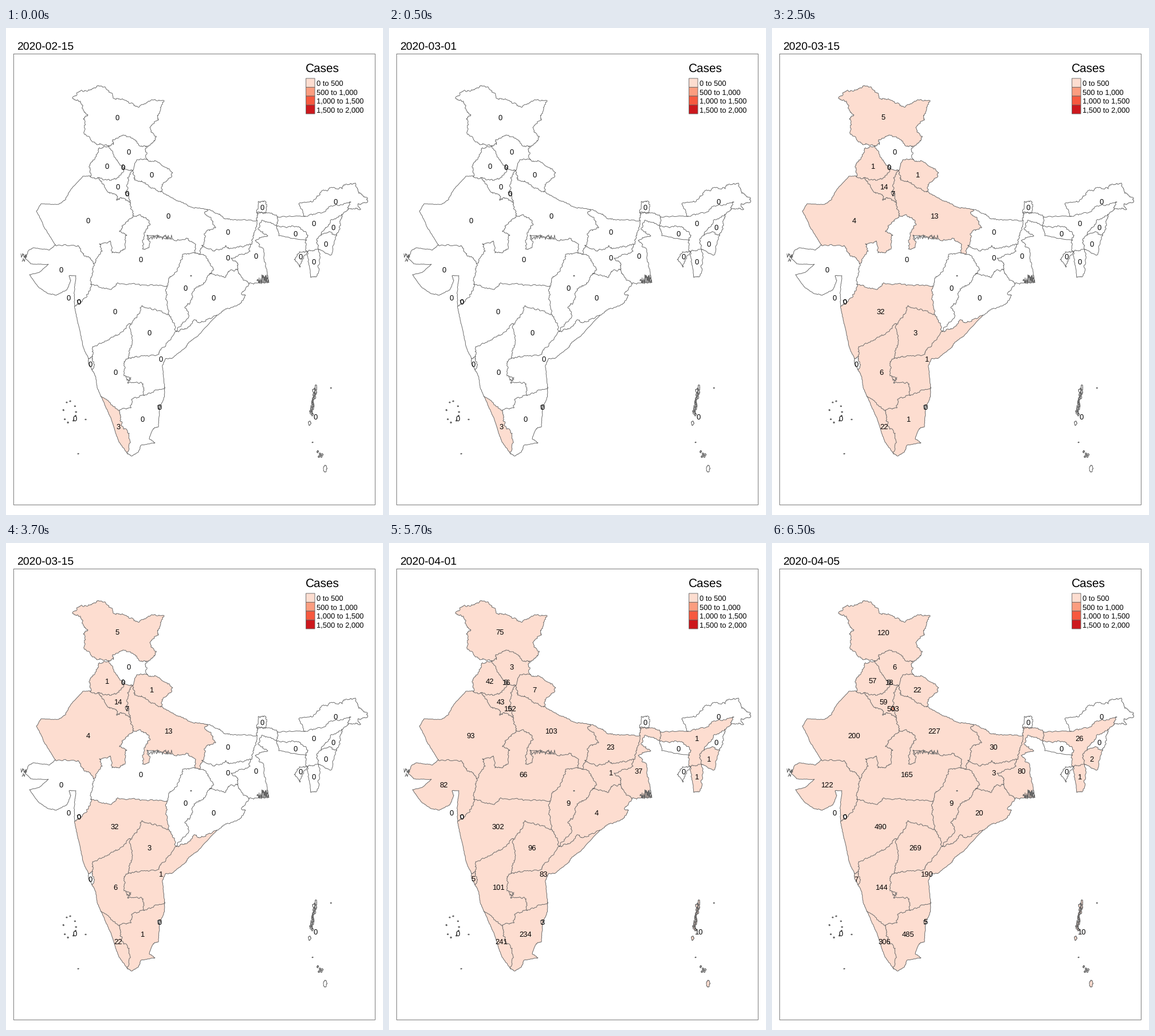
A matplotlib script that plays this animation: 658x851 px, repeating every 8 s.

```python
import matplotlib.pyplot as plt
import numpy as np
from matplotlib.animation import FuncAnimation

W, H, DPI = 658, 851, 64
PT = 72 / DPI
LINE = "#666666"
REDS = ["#FDDDD0", "#FC9D7F", "#F7593F", "#CC181D"]
STEP = 500
DATES = ["2020-02-15", "2020-03-01", "2020-03-15", "2020-04-01", "2020-04-05"]
STARTS = [0, 500, 2500, 4500, 6500]

plt.rcParams.update({"font.family": "Liberation Sans", "text.hinting": "none"})
rng = np.random.default_rng(7)
fig = plt.figure(figsize=(W / DPI, H / DPI), dpi=DPI, facecolor="white")
ax = fig.add_axes([0, 0, 1, 1])
ax.set(xlim=(0, W), ylim=(H, 0))
ax.axis("off")

arcs, regions = {}, []


def rough(points, jag):
    """Split segments at midpoints pushed sideways by at most jag pixels."""
    p = np.array(points, float)
    for _ in range(4):
        d = np.diff(p, axis=0)
        length = np.hypot(*d.T)[:, None] + 1e-9
        push = np.minimum(0.38 * length, jag) * rng.uniform(-1, 1, length.shape)
        out = np.empty((2 * len(p) - 1, 2))
        out[::2] = p
        out[1::2] = (p[:-1] + p[1:]) / 2 + push * np.c_[-d[:, 1], d[:, 0]] / length
        p = out
    return p


def line(points):
    ax.plot(*np.transpose(points), color=LINE, lw=0.95 * PT, zorder=2)


def arc(name, *points, jag=1.7):
    arcs[name] = rough(points, jag)
    line(arcs[name])


def coast(name, *points):
    arc(name, *points, jag=0.5)


def blob(name, x, y, w, h):
    a = np.linspace(0, 2 * np.pi, 8)[:-1]
    r = rng.uniform(0.7, 1.2, 7) / 2
    p = np.c_[x + w * r * np.cos(a), y + h * r * np.sin(a)]
    arc(name, *p, p[0], jag=0.4)


def creeks(x0, y0, x1, y1, n):
    line(np.c_[np.linspace(x0, x1, n), rng.uniform(y0, y1, n)])


def text(x, y, s, size=13, ha="left"):
    return ax.text(x, y, s, fontsize=size * PT, ha=ha, va="baseline", color="black", zorder=4)


def box(x, y, w, h, fc="none"):
    ax.add_patch(plt.Rectangle((x, y), w, h, fc=fc, ec=LINE, lw=0.9 * PT, snap=False, zorder=3))


def ring(spec):
    return np.concatenate([arcs[n.lstrip("-")][::-1 if n[0] == "-" else 1] for n in spec.split()])


def region(spec, x, y, *counts):
    """Shapes from joined arcs, with the counts from March to April 5th."""
    counts = counts or (0, 0, 0, 0)
    shapes = [ax.fill(*ring(s).T, fc="white", ec="none", zorder=1)[0]
              for s in spec.split("|") if s]
    regions.append((shapes, text(x, y + 4.6, "", ha="center"), (counts[0], *counts)))


# Points where three borders, or a border and the outline, meet
jk_hp_pb, jk_hp, hp_uk, hp_uk_up = (179, 206), (246, 207), (247, 230), (221, 249)
hp_hr_pb, hr_pb_rj, pb_rj, hr_rj_up = (207, 246), (160, 262), (147, 259), (217, 305)
uk_up, br_up, br_jh_up, cg_jh_up = (270, 286), (351, 317), (342, 380), (337, 395)
cg_mp_up, mp_rj_up, gj_rj, gj_mp_rj = (330, 393), (222, 328), (86, 379), (153, 412)
gj_mh_mp, gj_mh, cg_mh_mp, cg_mh_tg = (148, 448), (120, 486), (281, 451), (283, 500)
ap_cg_tg, ka_mh_tg, ap_ka_tg, ap_ka_tn = (298, 530), (217, 517), (214, 577), (241, 642)
ap_tn, ka_kl_tn, kl_tn, ka_kl = (277, 628), (198, 668), (212, 744), (166, 644)
ga_mh, ga_ka_mh, ga_ka, ap_or = (144, 578), (151, 574), (150, 597), (368, 502)
or_wb, jh_or_wb, cg_jh_or, br_jh_wb = (424, 447), (403, 422), (355, 430), (427, 378)
br_wb, as_wb, as_ml_wb, as_ml = (438, 336), (474, 330), (473, 346), (524, 371)
ar_as, ar_as_nl, as_nl, as_mn_nl = (522, 329), (597, 317), (586, 326), (550, 361)
mn_nl, as_mn_mz, as_mz_tr = (577, 362), (546, 387), (526, 391)

# North
arc("jk", jk_hp_pb, (155, 201), (137, 186), (135, 159), (143, 152), (136, 145), (130, 128),
    (116, 122), (130, 110), (149, 108), (159, 101), (173, 103), (192, 125), (205, 125),
    (230, 138), (252, 127), (276, 127), (266, 152), (266, 161), (251, 174), (262, 189),
    (257, 199), jk_hp)
arc("jkhp", jk_hp_pb, (188, 203), (187, 195), (205, 187), (224, 195), (237, 206), jk_hp)
arc("hpE", jk_hp, (243, 213), hp_uk)
arc("hpuk", hp_uk, (229, 230), hp_uk_up)
arc("hphr", hp_uk_up, hp_hr_pb)
arc("hppb", hp_hr_pb, (192, 229), jk_hp_pb)
arc("pbW", jk_hp_pb, (161, 211), (155, 229), (145, 243), pb_rj)
arc("pbrj", pb_rj, hr_pb_rj)
arc("pbhr", hr_pb_rj, (184, 266), (197, 261), hp_hr_pb)
arc("hrrj", hr_pb_rj, (167, 268), (178, 287), (192, 291), (193, 301), (201, 296), hr_rj_up)
arc("hrup", hr_rj_up, (212, 283), (212, 262), hp_uk_up)
arc("ukE", hp_uk, (267, 235), (291, 253), (278, 269), uk_up)
arc("ukup", uk_up, (243, 270), (225, 266), hp_uk_up)
arc("upN", uk_up, (298, 302), (326, 314), br_up, jag=1)
arc("upbr", br_up, (347, 324), (360, 337), (366, 349), (349, 356), br_jh_up)
arc("upjh", br_jh_up, cg_jh_up)
arc("upcg", cg_jh_up, cg_mp_up)
arc("upmp", cg_mp_up, (328, 376), (315, 367), (297, 372), (246, 362), (250, 383), (238, 386),
    (241, 361), (250, 345), (249, 336), (235, 327), mp_rj_up)
arc("uprj", mp_rj_up, hr_rj_up)

# West
coast("rjW", pb_rj, (134, 259), (110, 287), (104, 300), (92, 308), (62, 307), (53, 320),
      (69, 352), gj_rj)
arc("rjgj", gj_rj, (126, 380), (136, 397), (146, 402), gj_mp_rj)
arc("rjmp", gj_mp_rj, (168, 390), (163, 377), (182, 372), (185, 393), (196, 393), (208, 385),
    (211, 362), (198, 356), (203, 345), mp_rj_up)
coast("gjW", gj_rj, (76, 388), (48, 384), (39, 389), (33, 402), (43, 412), (74, 413),
      (58, 427), (41, 431), (55, 451), (73, 464), (87, 467), (106, 458), (113, 441),
      (110, 433), (122, 433), (119, 462), gj_mh)
arc("gjmh", gj_mh, (133, 478), (144, 464), gj_mh_mp)
arc("gjmp", gj_mh_mp, (148, 436), gj_mp_rj)
arc("mpmh", gj_mh_mp, (184, 457), (196, 446), (240, 449), cg_mh_mp)
arc("mpcg", cg_mh_mp, (284, 437), (302, 417), (308, 396), cg_mp_up)
arc("mhcg", cg_mh_mp, (279, 472), cg_mh_tg)
arc("mhtg", cg_mh_tg, (262, 492), (237, 485), (229, 503), ka_mh_tg)
arc("mhka", ka_mh_tg, (205, 530), (180, 545), (151, 557), ga_ka_mh)
arc("mhga", ga_ka_mh, ga_mh)
coast("mhW", gj_mh, (125, 513), (134, 555), ga_mh)
arc("gaka", ga_ka_mh, (153, 585), ga_ka)
coast("gaW", ga_mh, (145, 588), ga_ka)

# South
arc("cgtg", cg_mh_tg, (290, 510), ap_cg_tg)
arc("cgor", ap_cg_tg, (319, 504), (313, 487), (321, 482), (328, 456), (340, 450), cg_jh_or)
arc("cgjh", cg_jh_or, (361, 420), (348, 398), cg_jh_up)
arc("tgap", ap_cg_tg, (271, 560), (267, 570), (230, 575), ap_ka_tg)
arc("tgka", ap_ka_tg, (220, 548), ka_mh_tg)
arc("apor", ap_cg_tg, (317, 523), (330, 510), (338, 515), ap_or)
coast("apE", ap_or, (333, 540), (319, 549), (314, 558), (290, 577), (278, 578), (273, 590),
      ap_tn)
arc("aptn", ap_tn, ap_ka_tn)
arc("apka", ap_ka_tn, (237, 620), (212, 620), (218, 613), (206, 608), (206, 583), ap_ka_tg)
coast("kaW", ga_ka, (155, 606), (160, 631), ka_kl)
arc("kakl", ka_kl, ka_kl_tn)
arc("katn", ka_kl_tn, (218, 664), (222, 647), ap_ka_tn)
coast("klW", ka_kl, (183, 681), (197, 723), kl_tn)
arc("kltn", ka_kl_tn, (200, 683), (206, 701), (215, 708), kl_tn)
coast("tnE", ap_tn, (276, 645), (268, 666), (266, 697), (257, 700), (250, 718), (260, 725),
      (236, 729), (231, 741), (219, 748), kl_tn)

# East
arc("orE", or_wb, (411, 465), (418, 467), (410, 481), (385, 491), ap_or, jag=1)
arc("orwb", jh_or_wb, (410, 433), or_wb)
arc("orjh", cg_jh_or, (383, 436), (388, 425), jh_or_wb)
arc("jhwb", br_jh_wb, (426, 390), (393, 402), (405, 413), jh_or_wb)
arc("brjh", br_jh_up, (364, 390), (384, 380), (394, 385), br_jh_wb)
arc("brN", br_up, (373, 325), (382, 333), (405, 335), br_wb, jag=1)
arc("brwb", br_wb, (433, 360), br_jh_wb)
arc("wbN", br_wb, (438, 323), (455, 323), as_wb)
arc("wbas", as_wb, as_ml_wb)
arc("wbE", as_ml_wb, (446, 336), (440, 350), (457, 363), (435, 371), (450, 388), (454, 420),
    (457, 445), or_wb)
arc("sk", (438, 323), (440, 304), (454, 304), (454, 322), (438, 323))
arc("asN", as_wb, ar_as, jag=1)
arc("asar", ar_as, (556, 321), (565, 312), (602, 304), ar_as_nl)
arc("asE", ar_as_nl, as_nl)
arc("asnl", as_nl, (566, 337), as_mn_nl)
arc("asmn", as_mn_nl, (542, 371), as_mn_mz)
arc("asmz", as_mn_mz, as_mz_tr)
arc("asS", as_mz_tr, as_ml)
arc("asml", as_ml, (527, 362), (511, 347), as_ml_wb)
arc("mlS", as_ml_wb, (476, 363), as_ml, jag=1)
arc("nlE", as_nl, (584, 345), mn_nl)
arc("nlmn", mn_nl, (568, 357), as_mn_nl)
arc("mnE", mn_nl, (567, 397), as_mn_mz, jag=1)
arc("mz", as_mn_mz, (545, 429), (532, 436), as_mz_tr)
arc("tr", as_mz_tr, (512, 391), (503, 405), (513, 418), as_mz_tr)
arc("ar", ar_as, (511, 308), (535, 304), (548, 288), (566, 279), (587, 281), (593, 273),
    (610, 271), (615, 288), (631, 298), (629, 305), (614, 308), (619, 317), ar_as_nl)

# Small territories, island chains and dense creeks
for name, x, y in [("dl", 211, 289), ("ch", 205, 243), ("dn", 127, 478), ("py", 267, 662)]:
    blob(name, x, y, 6, 8)
chain = "an"
for i, y in enumerate(np.linspace(628, 675, 18)):
    blob(f"an{i}", 539.5 - (y - 628) / 7 + rng.uniform(-2, 2), y, *rng.uniform((2, 4), (5, 10)))
    chain += f"|an{i}"
blob("an", 530, 690, 5, 8)
blob("nicobar", 557, 770, 6, 14)
for i in range(5):
    blob(f"islet{i}", 544 + 2 * i, 739 + rng.uniform(0, 12), 3, 4)
for i in range(9):
    a = 2.4 * i
    blob(f"atoll{i}", 111 + 11 * np.cos(a), 671 + 19 * np.sin(a), 2, 2)
for i, (x, y) in enumerate([(126, 744), (139, 684), (535, 724), (567, 629), (323, 433)]):
    blob(f"speck{i}", x, y, 2, 1.5)

creeks(438, 436, 447, 446, 18)
creeks(446, 430, 459, 447, 34)
creeks(26, 394, 36, 402, 24)
creeks(28, 401, 33, 409, 8)
creeks(246, 361, 290, 370, 40)
creeks(209, 609, 218, 617, 9)

region("jk -jkhp", 194, 156, 0, 5, 75, 120)
region("jkhp hpE hpuk hphr hppb", 214, 216, 0, 0, 3, 6)
region("pbW pbrj pbhr hppb", 176, 241, 0, 1, 42, 57)
region("ch", 204.5, 243, 0, 0, 16, 18)
region("ukE ukup -hpuk", 254, 256, 0, 1, 7, 22)
region("hrrj hrup hphr -pbhr", 195, 277, 0, 14, 43, 59)
region("rjW rjgj rjmp uprj -hrrj -pbrj", 143, 336, 0, 4, 93, 200)
region("upN upbr upjh upcg upmp uprj hrup -ukup", 283, 328, 0, 13, 103, 227)
region("dl", 211, 289, 0, 7, 152, 503)
region("brN brwb -brjh -upbr", 387, 356, 0, 0, 23, 30)
region("sk", 447, 313)
region("ar -asar", 575, 303)
region("nlE nlmn -asnl", 571, 348)
region("mnE -asmn -nlmn", 558, 377, 0, 0, 1, 2)
region("mz -asmz", 537, 408, 0, 0, 1, 1)
region("tr", 514, 399)
region("mlS asml", 505, 359)
region("asN asar asE asnl asmn asmz asS asml -wbas", 537, 341, 0, 0, 1, 26)
region("wbN wbas wbE -orwb -jhwb -brwb", 436, 398, 0, 0, 37, 80)
region("brjh jhwb -orjh cgjh -upjh", 387, 401, 0, 0, 1, 3)
region("orjh orwb orE -apor cgor", 362, 471, 0, 0, 4, 20)
region("mhcg cgtg cgor cgjh upcg -mpcg", 313, 454, 0, 0, 9, 9)
region("mpmh mpcg upmp -rjmp -gjmp", 235, 404, 0, 0, 66, 165)
region("gjW gjmh gjmp -rjgj", 96, 422, 0, 0, 82, 122)
region("", 109, 471)
region("mpmh mhcg mhtg mhka mhga -mhW gjmh", 190, 495, 0, 32, 302, 490)
region("dn", 127, 478)
region("mhtg -tgka -tgap -cgtg", 250, 532, 0, 3, 96, 269)
region("apor apE aptn apka -tgap", 270, 578, 0, 1, 83, 190)
region("mhka gaka kaW kakl katn apka tgka", 191, 601, 0, 6, 101, 144)
region("mhga gaW -gaka", 147, 587, 0, 0, 5, 7)
region("", 120, 682)
region("klW -kltn -kakl", 196, 696, 3, 22, 241, 306)
region("tnE -kltn katn -aptn", 238, 683, 0, 1, 234, 485)
region("py", 268, 662, 0, 0, 3, 5)
region(chain + "|nicobar", 540, 679, 0, 0, 10, 10)

# Frame, title and legend
box(13.3, 45.3, 631, 788)
title = text(19, 38, "", 19.4)
text(522.5, 76.8, "Cases", 20.8)
labels = ["0 to 500", "500 to 1,000", "1,000 to 1,500", "1,500 to 2,000"]
for i, (label, color) in enumerate(zip(labels, REDS)):
    y = 88 + 15.5 * i
    box(523.5, y, 15.5, 15.5, color)
    text(542.5, y + 12.6, label, 12.9)


def update(frame):
    step = np.searchsorted(STARTS, frame * STEP, side="right") - 1
    title.set_text(DATES[step])
    for shapes, label, counts in regions:
        n = counts[step]
        label.set_text(str(n))
        for shape in shapes:
            shape.set_facecolor(REDS[n // 500] if n else "white")


anim = FuncAnimation(fig, update, frames=16, interval=STEP, repeat=True, repeat_delay=0)
plt.show()
```
